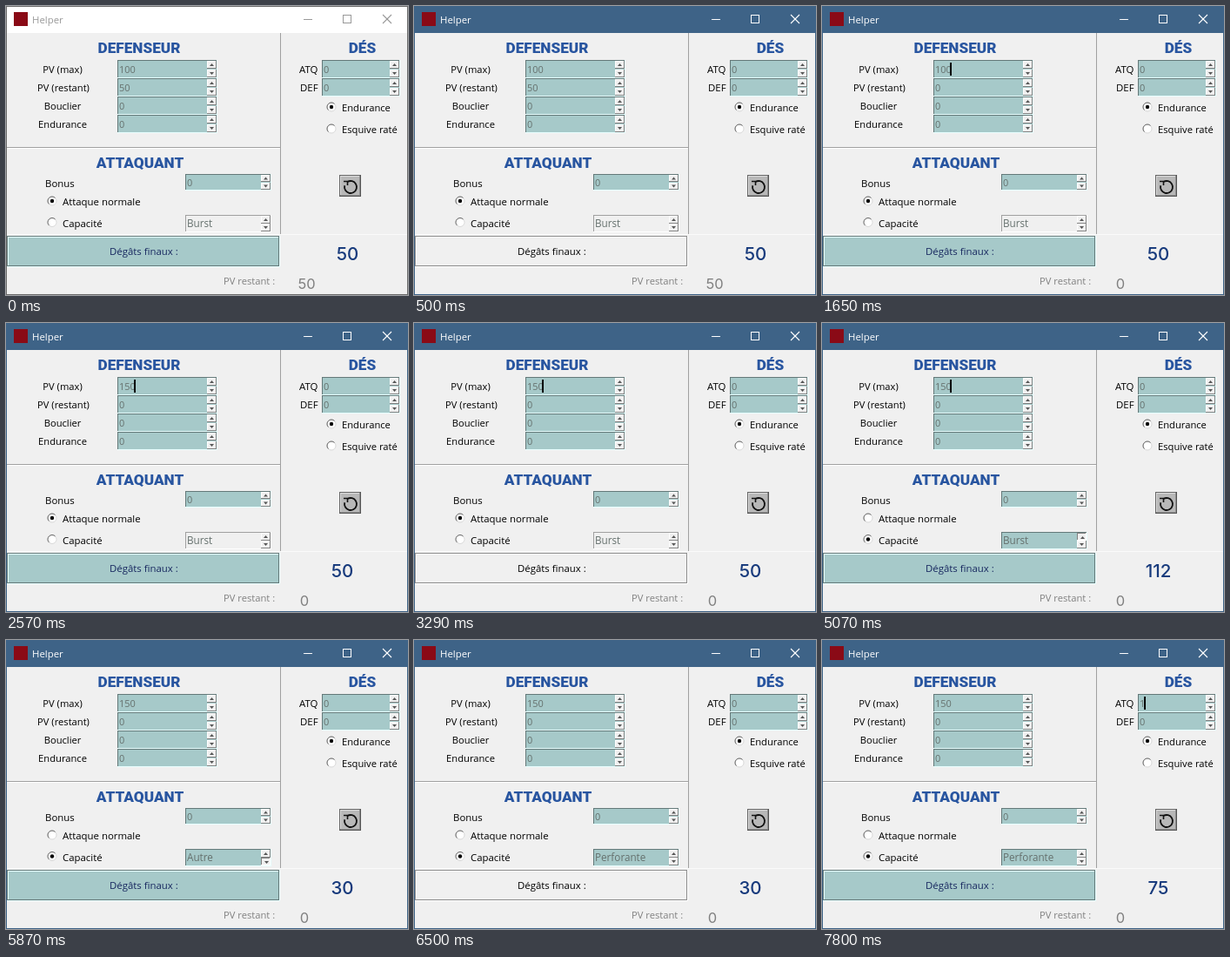
Write an HTML page with a canvas that moves like this. It is 462x332 px and loops after 8000 ms.

```html
<!DOCTYPE html>
<html lang="fr">
<head>
<meta charset="utf-8">
<title>Helper</title>
<style>
html, body { margin: 0; width: 100%; height: 100%; overflow: hidden; background: #f0f0f0; }
canvas { display: block; }
</style>
</head>
<body>
<canvas id="stage" width="462" height="332"></canvas>
<script>
const ctx = document.getElementById('stage').getContext('2d');
const LOOP = 8000;
const TEAL = '#a6c9c9', FACE = '#f0f0f0', GREY = '#a0a0a0';
const UI = '"Open Sans", "Noto Sans", sans-serif';

// Times at which the caret in the "PV (max)" field turns on or off
const BLINKS = [1650, 2080, 2280, 2700, 2930, 3320, 3550, 3880, 4180, 4480,
  4810, 5140, 5440, 5870, 6100, 6500, 6740, 7170];

const within = (t, ...spans) => spans.some(([from, to]) => t >= from && t < to);

// Last value whose start time has been reached: step(t, first, time, value, ...)
function step(t, value, ...changes) {
  for (let i = 0; i < changes.length; i += 2) if (t >= changes[i]) value = changes[i + 1];
  return value;
}

function rect(x, y, w, h, color) {
  ctx.fillStyle = color;
  ctx.fillRect(x, y, w, h);
}

function bevel(x, y, w, h, topLeft, bottomRight) {
  rect(x, y, w, 1, topLeft);
  rect(x, y, 1, h, topLeft);
  rect(x, y + h - 1, w, 1, bottomRight);
  rect(x + w - 1, y, 1, h, bottomRight);
}

function groove(x, y, w, h, dark, light) {
  bevel(x, y, w, h, dark, light);
  bevel(x + 1, y + 1, w - 2, h - 2, light, dark);
}

function text(s, x, y, { size = 11.4, color = '#000', font = UI, weight = 400, align = 'left' } = {}) {
  ctx.font = `${weight} ${size}px ${font}`;
  ctx.fillStyle = color;
  ctx.textAlign = align;
  ctx.fillText(s, x, y);
}

const label = (s, center, y) => text(s, center, y, { size: 11.2, align: 'center' });
const heading = (s, center, y) =>
  text(s, center, y, { size: 17.2, color: '#2855a0', font: 'Roboto, sans-serif', weight: 800, align: 'center' });

function line(color, width, ...points) {
  ctx.strokeStyle = color;
  ctx.lineWidth = width;
  ctx.beginPath();
  points.forEach(([x, y]) => ctx.lineTo(x, y));
  ctx.stroke();
}

function triangle(x, y, dir) {
  ctx.fillStyle = '#555';
  ctx.beginPath();
  ctx.moveTo(x - 2.5, y + dir * 1.5);
  ctx.lineTo(x + 2.5, y + dir * 1.5);
  ctx.lineTo(x, y - dir * 1.5);
  ctx.fill();
}

function spinbox(x, y, w, h, value, { enabled = true, pressed = 0, selected = false, caret } = {}) {
  rect(x, y, w, h, enabled ? TEAL : FACE);
  bevel(x, y, w, h, enabled ? '#647979' : GREY, enabled ? '#e8ffff' : '#fff');
  const bx = x + w - 12, half = Math.floor((h - 2) / 2);
  for (const dir of [1, -1]) {
    const by = dir > 0 ? y + 1 : y + h - 1 - half;
    const down = pressed === dir;
    rect(bx, by, 11, half, FACE);
    bevel(bx, by, 11, half, down ? '#808080' : '#fff', down ? '#fff' : '#808080');
    triangle(bx + 5.5 + down, by + half / 2 + down, dir);
  }
  const base = y + Math.round(h / 2) + 4;
  const numeric = /^\d*$/.test(value);
  if (selected) rect(x + 2, y + 3, value.length * 6.2 + 1, 15, '#0078d7');
  text(value, x + 2, base, { size: numeric ? 11 : 11.7, color: selected ? '#fff' : '#65706d' });
  if (caret !== undefined) rect(caret, y + 3, 2, 15, '#000');
}

function radio(x, y, on) {
  ctx.beginPath();
  ctx.arc(x, y, 5, 0, 7);
  ctx.fillStyle = '#fff';
  ctx.fill();
  ctx.lineWidth = 1;
  ctx.strokeStyle = '#d9d9d9';
  ctx.stroke();
  ctx.beginPath();
  ctx.arc(x, y, 5, Math.PI * .75, Math.PI * 1.75);
  ctx.strokeStyle = '#686868';
  ctx.stroke();
  if (!on) return;
  ctx.beginPath();
  ctx.arc(x, y, 2.2, 0, 7);
  ctx.fillStyle = '#000';
  ctx.fill();
}

function titleBar(active) {
  rect(0, 0, 462, 31, active ? '#3e6387' : '#fff');
  const ink = active ? '#fff' : '#999';
  rect(9, 7, 16, 16, '#8a0a16');
  text('Helper', 30, 19.5, { color: ink });
  rect(342, 15, 10, 1, ink);
  ctx.strokeStyle = ink;
  ctx.lineWidth = 1;
  ctx.strokeRect(387.5, 10.5, 9, 9);
  line(ink, 1.1, [433, 10], [443, 20]);
  line(ink, 1.1, [443, 10], [433, 20]);
}

function rerollButton() {
  rect(383, 194, 25, 25, '#b8b8b8');
  bevel(383, 194, 25, 25, '#666', '#555');
  bevel(384, 195, 23, 23, '#dcdcdc', '#8c8c8c');
  ctx.beginPath();
  ctx.arc(396, 208, 7, -2.1, 3.4);
  ctx.strokeStyle = '#111';
  ctx.lineWidth = 1.8;
  ctx.stroke();
  line('#111', 1.6, [388, 201.5], [392.5, 201.5], [392.5, 206]);
}

function defender(t) {
  heading('DEFENSEUR', 153, 54);
  label('PV (max)', 65, 77);
  label('PV (restant)', 66, 98);
  label('Bouclier', 65, 119);
  label('Endurance', 65, 140);

  const selected = within(t, [1780, 2330]);
  const max = step(t, '100', 2330, '1', 2430, '15', 2560, '150');
  const blinkOn = BLINKS.filter(time => time <= t).length % 2;
  const caret = selected ? 129 : 129 + max.length * 6;
  spinbox(128, 62, 115, 21, max, { selected, caret: blinkOn ? caret : undefined });
  spinbox(128, 83, 115, 21, step(t, '50', 530, '0'));
  spinbox(128, 104, 115, 21, '0');
  spinbox(128, 125, 115, 21, '0');
}

function attacker(t) {
  heading('ATTAQUANT', 154, 186);
  text('Bonus', 45, 208);
  spinbox(206, 193, 99, 19, '0');
  const skill = t >= 3980;
  radio(53, 224, !skill);
  text('Attaque normale', 65, 229);
  radio(53, 248.5, skill);
  text('Capacité', 65, 254);
  const name = step(t, 'Burst', 5140, 'Autre', 5950, 'Burst', 6300, 'Perforante');
  const pressed = within(t, [5070, 5240]) ? 1 : within(t, [5870, 6020], [6270, 6300]) ? -1 : 0;
  spinbox(206, 240, 99, 20, name, { enabled: skill, pressed });
}

function dice(t) {
  heading('DÉS', 409.5, 54);
  text('ATQ', 337, 77);
  text('DEF', 338, 98);
  const caret = step(t, undefined, 7170, 370, 7270, 364, 7570, undefined, 7700, 364, 7800, 370);
  spinbox(363, 62, 90, 21, step(t, '0', 7700, '', 7800, '1'),
    { caret, selected: within(t, [7270, 7700]) });
  spinbox(363, 83, 90, 21, '0');
  radio(374, 116, true);
  text('Endurance', 386, 121, { size: 11.2 });
  radio(374, 141, false);
  text('Esquive raté', 386, 146, { size: 11.2 });
  rerollButton();
}

function results(t) {
  const pressed = within(t, [500, 530], [3290, 3320], [4510, 4610], [5470, 5540], [6500, 6570]);
  rect(1, 264, 314, 36, pressed ? FACE : TEAL);
  groove(1, 264, 314, 36, pressed ? '#8c8c8c' : '#647979', pressed ? '#fff' : '#e8ffff');
  text('Dégâts finaux :', 119, 286, { color: pressed ? '#000' : '#17275f' });

  const digits = 'Inter, sans-serif';
  const damage = step(t, '50', 3320, '75', 4610, '112', 5540, '30', 6570, '75');
  text(damage, step(t, 392.5, 530, 386.5), 292,
    { size: 20.5, color: '#173a7c', font: digits, weight: 500, align: 'center' });
  text('PV restant :', 250, 320, { size: 11.2, color: '#808080' });
  text(step(t, '50', 530, '0'), step(t, 345.5, 530, 343), 324.5,
    { size: 16.5, color: '#808080', font: digits, align: 'center' });
}

function draw(t) {
  rect(0, 0, 462, 332, FACE);
  titleBar(t >= 500);
  rect(1, 162, 314, 1, GREY);
  rect(1, 163, 314, 1, '#fff');
  rect(315, 31, 1, 232, GREY);
  rect(1, 262, 460, 1, '#fafafa');
  defender(t);
  attacker(t);
  dice(t);
  results(t);
  const frame = t >= 500 ? '#3e6387' : '#6c6c6c';
  bevel(0, 0, 462, 332, frame, frame);
}

function tick() {
  draw(performance.now() % LOOP);
  requestAnimationFrame(tick);
}
tick();
</script>
</body>
</html>
```
